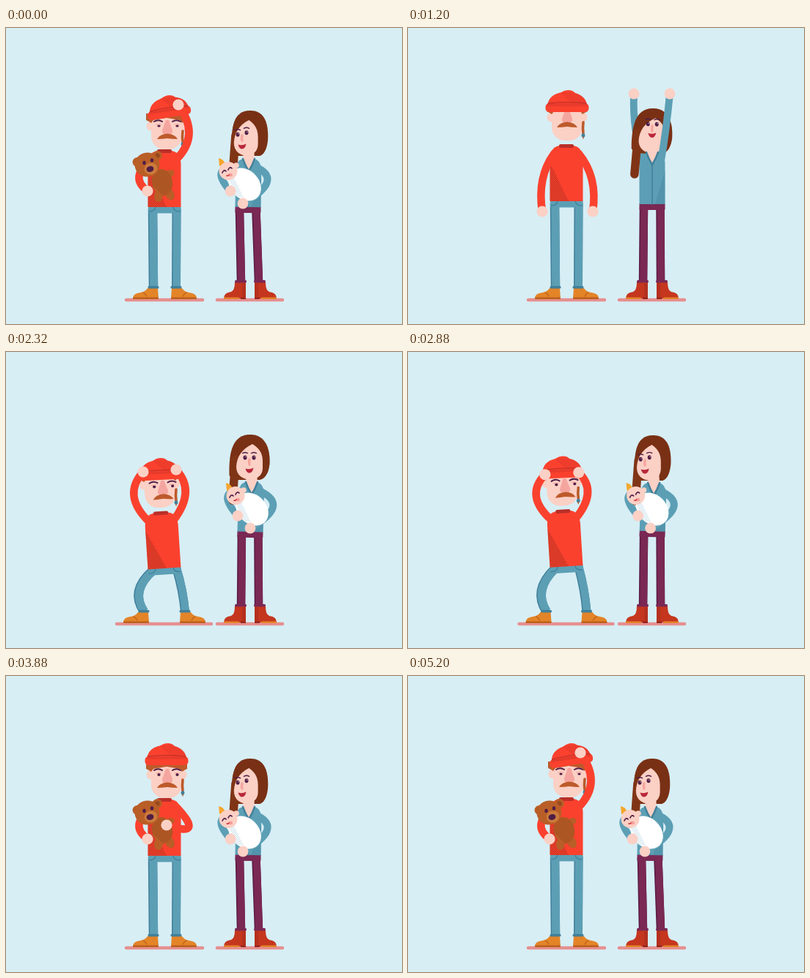
Write an HTML page with a canvas that moves like this. It is 540 px wide and 405 px high and loops after 5240 ms.

```html
<!DOCTYPE html>
<html lang="en">
<head>
<meta charset="utf-8">
<title>New parents</title>
<style>
html, body { margin: 0; width: 100%; height: 100%; overflow: hidden; background: #d7eef5; }
canvas { display: block; width: 100vw; height: 100vh; }
</style>
</head>
<body>
<canvas id="stage" width="540" height="405"></canvas>
<script>
const ctx = document.getElementById('stage').getContext('2d');
const LOOP = 5240;
const C = {
  sky: '#d7eef5', skin: '#fbd0c5', pink: '#f5a59f', red: '#fa412e', redDark: '#b92f28',
  jeans: '#5c9fb5', jeansDark: '#41809a', ginger: '#bd5a2b', hair: '#803416', hairDark: '#6b2a13',
  plum: '#7a2854', plumDark: '#5a1b46', ink: '#4f1d45', shoe: '#e38428', sole: '#bb601c',
  boot: '#c5361f', bootDark: '#96261c', bear: '#b95e27', bearDark: '#97481f', ground: '#e68f8f'
};

// --- motion -------------------------------------------------------------
const clamp = v => Math.max(0, Math.min(1, v));
const smooth = v => v * v * (3 - 2 * v);
function mix(a, b, k) {
  if (typeof a === 'number') return a + (b - a) * k;
  if (Array.isArray(a)) return a.map((v, i) => mix(v, b[i], k));
  const out = {};
  for (const n in a) out[n] = mix(a[n], b[n], k);
  return out;
}
function at(keys, t) {
  let i = 0;
  while (i < keys.length - 1 && keys[i + 1][0] <= t) i++;
  if (i === keys.length - 1) return keys[i][1];
  const [t0, a] = keys[i], [t1, b] = keys[i + 1];
  return mix(a, b, smooth(clamp((t - t0) / (t1 - t0))));
}
const vary = (pose, change) => ({ ...pose, ...change });

// waist, collar, head, turn, hat (x, y, tilt), gaze, hands, elbows, ankles, knee bend, eyes, brows, braid
const mStand = {
  waist: [219, 240], collar: [221, 164], head: [223, 141], rot: 0, hat: [0, 0, 0], look: [3, 0],
  lh: [188, 249], le: [173, 204], rh: [283, 241], re: [249, 222],
  lf: 201, rf: 232, bend: [0, 0], eye: 0, brow: 0, braid: 0
};
const mLeft = vary(mStand, { waist: [217, 239], collar: [217, 161], head: [218, 138], lh: [184, 249], le: [172, 203] });
const mLookUp = vary(mStand, {
  waist: [216, 237], collar: [216, 160], head: [217, 131], hat: [0, 6, 0], look: [0, -4],
  lh: [183, 251], le: [176, 204], rh: [252, 251], re: [259, 204], brow: 1
});
const mPanic = vary(mStand, {
  waist: [216, 296], collar: [211, 219], head: [210, 190], rot: -.05, hat: [1, 7, 0], look: [4, 3],
  lh: [187, 164], le: [158, 196], rh: [232, 161], re: [259, 190],
  lf: 188, rf: 244, bend: [-17, 2], eye: 1, brow: 1
});
const mShake = vary(mPanic, { waist: [218, 295], collar: [216, 218], head: [218, 190], rot: .07, lh: [193, 162], rh: [239, 163], re: [265, 190] });
const mReach = vary(mStand, {
  waist: [216, 242], collar: [216, 165], head: [216, 141], hat: [-2, 3, -.08], look: [0, -6],
  lh: [191, 72], le: [184, 128], rh: [240, 72], re: [249, 128], eye: .7, brow: 1
});
const mHold = vary(mStand, {
  waist: [216, 246], collar: [216, 168], head: [219, 144], look: [1, 0], lh: [193, 223], le: [167, 204],
  rh: [219, 204], re: [272, 222], eye: 1
});
const mDip = vary(mHold, { waist: [216, 256], collar: [216, 178], head: [218, 156], bend: [-7, 7] });
const mBonk = vary(mHold, {
  waist: [216, 249], collar: [217, 172], head: [220, 149], hat: [0, 3, 0], look: [0, 1], lh: [192, 225],
  rh: [217, 203], bend: [-4, 4], eye: 0, brow: 7, braid: 1
});
const mEnd = vary(mHold, {
  waist: [216, 245], collar: [216, 167], head: [219, 143], hat: [4, 1, -.16],
  rh: [235, 105], re: [265, 146], eye: .8
});
const manKeys = [
  [40, mLeft], [400, mStand], [700, mStand], [980, mLeft], [1180, mLookUp], [1400, mLookUp],
  [1640, mPanic], [1880, mShake], [2100, mPanic], [2360, mPanic], [2580, mShake], [2840, mPanic],
  [3160, mLookUp], [3330, mReach], [3560, mReach], [3670, mDip], [3860, mHold], [4320, mHold],
  [4390, mBonk], [4440, mBonk], [4640, mHold], [4800, mHold], [5060, mEnd], [5240, mEnd]
];

const wEnd = {
  waist: [330, 245], collar: [331, 178], head: [332, 143], rot: 0, look: [-8, 0],
  lh: [306, 223], le: [275, 188], rh: [323, 240], re: [378, 209], baby: [0, 0]
};
const cradle = (x, y, change) => vary(wEnd, {
  lh: [306 + x, 223 + y], le: [275 + x, 188 + y], rh: [323 + x, 240 + y], re: [378 + x, 209 + y],
  baby: [x, y], ...change
});
const wLean = vary(wEnd, {
  waist: [335, 251], collar: [337, 182], head: [347, 153], rot: .2, look: [0, -10],
  lh: [283, 241], le: [318, 234], rh: [367, 252], re: [374, 214]
});
const wStand = vary(wLean, { waist: [333, 249], collar: [334, 179], head: [338, 149], rot: .06, look: [-4, -4] });
const wReach = vary(wEnd, {
  waist: [333, 241], collar: [333, 169], head: [333, 140], rot: .03, look: [0, -10],
  lh: [308, 90], le: [306, 142], rh: [357, 90], re: [352, 142]
});
const wDip = cradle(8, 8, { waist: [333, 254], collar: [334, 186], head: [332, 154], look: [-6, 3] });
const wFront = cradle(10, 1, { waist: [333, 246], collar: [335, 177], head: [332, 143], look: [0, 0] });
const wGlance = cradle(15, 0, { waist: [336, 247], collar: [337, 178], head: [336, 145], rot: .02 });
const wWatch = cradle(7, 1, { waist: [333, 245], collar: [335, 178], head: [333, 144] });
const womanKeys = [
  [40, wStand], [380, wLean], [760, wLean], [960, wStand], [1160, wReach], [1390, wReach],
  [1500, wDip], [1700, wFront], [1960, wGlance], [2240, wFront], [2480, wFront],
  [2800, wWatch], [3280, wGlance], [3500, wGlance], [3900, wEnd], [4340, wWatch], [4560, wWatch],
  [5000, wEnd], [5240, wEnd]
];

// --- drawing helpers ----------------------------------------------------
function fill(color, path) { ctx.beginPath(); path(); ctx.fillStyle = color; ctx.fill(); }
function oval(color, x, y, rx, ry = rx, a = 0) { fill(color, () => ctx.ellipse(x, y, rx, ry, a, 0, 7)); }
function poly(color, ...p) { fill(color, () => { for (let i = 0; i < p.length; i += 2) ctx.lineTo(p[i], p[i + 1]); }); }
function box(color, x, y, w, h, r = 0) { fill(color, () => ctx.roundRect(x, y, w, h, r)); }
function curve(color, w, a, c, b, cap = 'round') {
  ctx.beginPath(); ctx.moveTo(...a); ctx.quadraticCurveTo(...c, ...b);
  ctx.lineCap = cap; ctx.lineWidth = w; ctx.strokeStyle = color; ctx.stroke();
}
function hatch(color, path, x, y, w, h) {
  ctx.save();
  ctx.beginPath(); path(); ctx.clip();
  ctx.beginPath();
  for (let i = -h; i < w; i += 2.6) { ctx.moveTo(x + i, y); ctx.lineTo(x + i + h, y + h); }
  ctx.lineWidth = .9; ctx.strokeStyle = color; ctx.stroke();
  ctx.restore();
}
function local(x, y, a, draw) { ctx.save(); ctx.translate(x, y); ctx.rotate(a); draw(); ctx.restore(); }
const lean = p => Math.atan2(p.collar[0] - p.waist[0], p.waist[1] - p.collar[1]);
const tall = p => Math.hypot(p.collar[0] - p.waist[0], p.waist[1] - p.collar[1]);
function joint(p, x, y) {
  const a = lean(p), c = Math.cos(a), s = Math.sin(a);
  return [p.waist[0] + x * c - y * s, p.waist[1] + x * s + y * c];
}
function leg(hip, ankle, bend, w, color, dark) {
  const mid = [(hip[0] + ankle[0]) / 2 + bend * 1.5, (hip[1] + ankle[1]) / 2];
  const shift = ([x, y]) => [x + .7, y];
  curve(dark, w, hip, mid, ankle, 'butt');
  curve(color, w - 1.6, shift(hip), shift(mid), shift(ankle), 'butt');
}
function ground(x0, x1) { curve(C.ground, 4.5, [x0 + 2, 372], [x0 + 9, 372], [x1 - 2, 372]); }

// --- man ----------------------------------------------------------------
function shoe(x, dir) {
  local(x, 0, 0, () => {
    ctx.scale(dir, 1);
    fill(C.shoe, () => {
      ctx.moveTo(-8, 356); ctx.lineTo(6, 356); ctx.lineTo(7, 370); ctx.lineTo(-28, 370);
      ctx.quadraticCurveTo(-28, 363, -18, 362); ctx.quadraticCurveTo(-11, 361, -8, 356);
    });
    box(C.sole, -28, 368.5, 35, 2.5, 1);
    curve(C.sole, 1.2, [-14, 362], [-11, 363], [-9, 367]);
    box(C.jeansDark, -7.5, 353, 15, 3.5, 1.5);
  });
}
function hat([x, y, tilt]) {
  local(x, y - 27, tilt, () => {
    const dome = () => {
      ctx.moveTo(-27, -3); ctx.bezierCurveTo(-25, -18, -15, -20, -8, -22);
      ctx.bezierCurveTo(-2, -26, 7, -26, 11, -21); ctx.bezierCurveTo(22, -18, 27, -11, 27, -3);
    };
    fill(C.red, dome);
    hatch('rgba(160,35,35,.35)', dome, 8, -22, 20, 16);
    box(C.red, -29.5, -7, 59, 12, 5);
    curve(C.redDark, 1, [-26, -7], [0, -10], [26, -7]);
    hatch('rgba(160,35,35,.55)', () => ctx.rect(-27, -7, 54, 4), -27, -7, 54, 4);
  });
}
function manHead(p) {
  local(...p.head, p.rot, () => {
    const [lx, ly] = p.look;
    oval(C.skin, -22, -9, 5.5, 6.5);
    oval(C.skin, 22, -9, 5.5, 6.5);
    fill(C.skin, () => ctx.roundRect(-21, -28, 42, 51, [4, 4, 18, 18]));
    for (const s of [-1, 1]) poly(C.ginger, 0, -26, s * 28, -26, s * 28, -17, s * 24, -15, s * 21, -13, s * 18, -17, 0, -20);
    local(lx, ly, 0, () => {
      for (const s of [-1, 1]) {
        const x = s * 12.5;
        curve(C.ink, 2, [x - 5.5, -15 + p.brow], [x, -18.5 + p.brow], [x + 5.5, -15 + p.brow]);
        if (p.eye > .1) {
          oval(C.ink, x + 1, -9, 2.1, 2 * p.eye);
          curve(C.pink, 1, [x - 3, -11], [x, -12], [x + 4, -11]);
        }
      }
      fill(C.pink, () => {
        ctx.moveTo(-2, -17); ctx.lineTo(2, -17); ctx.lineTo(7, -3);
        ctx.quadraticCurveTo(8, 3, 0, 3); ctx.quadraticCurveTo(-8, 3, -7, -3);
      });
      fill(C.ginger, () => {
        ctx.moveTo(-14, 9); ctx.quadraticCurveTo(-10, 2, 0, 1.5); ctx.quadraticCurveTo(10, 2, 14, 9);
        ctx.quadraticCurveTo(7, 9, 0, 8); ctx.quadraticCurveTo(-7, 9, -14, 9);
      });
    });
    hat(p.hat);
  });
  const [x, y] = p.head;
  local(x + 22, y - 2, p.braid * -1.1, () => {
    curve(C.ginger, 3.6, [0, 0], [-1, 8], [0, 15]);
    oval(C.jeansDark, 0, 18, 2.4, 2.8);
    curve(C.ginger, 1.4, [0, 20], [0, 21], [0, 22]);
  });
}
function man(p, t) {
  const h = tall(p), bear = t < 40 || t >= 3400;
  ground(p.lf - 39, p.rf + 38);
  leg(joint(p, -16, 2), [p.lf, 355], p.bend[0], 12.5, C.jeans, C.jeansDark);
  leg(joint(p, 16.5, 2), [p.rf, 355], p.bend[1], 12, C.jeans, C.jeansDark);
  shoe(p.lf, 1);
  shoe(p.rf, -1);
  local(...p.waist, lean(p), () => {
    box(C.jeans, -22, -2, 44.5, 10.5, 2);
    for (const s of [-1, 1]) curve(C.jeansDark, 1.4, [s * 12, 0], [s * 13, 6], [s * 21, 6]);
    fill(C.red, () => {
      ctx.moveTo(-22.5, 0); ctx.lineTo(-22.5, 18 - h);
      ctx.quadraticCurveTo(-21, 2 - h, -9, 1 - h); ctx.lineTo(9, 1 - h);
      ctx.quadraticCurveTo(21, 2 - h, 22.5, 18 - h); ctx.lineTo(22.5, 0);
    });
    hatch('rgba(110,35,20,.6)', () => {
      ctx.moveTo(-22.5, 24 - h); ctx.lineTo(3, 0); ctx.lineTo(-22.5, 0);
    }, -23, -h, 27, h);
    box(C.redDark, -10, -1 - h, 20, 5, 2);
  });
  manHead(p);
  curve(C.red, 10.5, joint(p, -17, 12 - h), p.le, p.lh);
  curve(C.red, 10.5, joint(p, 17, 12 - h), p.re, p.rh);
  if (bear) teddy(t);
  if (t > 4040 && t < 5130) bottle(t);
  oval(C.skin, ...p.lh, 7.6);
  oval(C.skin, ...p.rh, 7.6);
}

// --- woman --------------------------------------------------------------
function boot(x, dir) {
  local(x, 0, 0, () => {
    ctx.scale(dir, 1);
    fill(C.boot, () => {
      ctx.moveTo(-8, 348); ctx.lineTo(7, 348); ctx.lineTo(7, 370); ctx.lineTo(-23, 370);
      ctx.quadraticCurveTo(-23, 362, -13, 361); ctx.quadraticCurveTo(-8, 359, -8, 348);
    });
    hatch(C.bootDark, () => ctx.rect(2, 349, 5, 19), 2, 349, 5, 19);
    box(C.shoe, -23, 368.5, 21, 2.5, 1);
    box(C.bootDark, 0, 368.5, 7, 2.5);
    box(C.plum, -8, 345, 16, 3.5, 1.5);
  });
}
function womanHead(p) {
  const [lx, ly] = p.look, side = Math.abs(lx);
  local(...p.head, p.rot, () => {
    const w = 27.5 - side * .4, right = 27.5 - side * .3, hair = () => {
      ctx.moveTo(-w, 26); ctx.bezierCurveTo(-w - 1, -8, -22, -30, 1, -30);
      ctx.bezierCurveTo(21, -30, right + 1, -12, right, 10);
      ctx.quadraticCurveTo(right - 2, 29, 14, 32); ctx.lineTo(-w + 6, 32);
    };
    fill(C.hair, hair);
    hatch(C.hairDark, hair, 4, -30, 30, 62);
  });
  const [x, y] = p.head;
  curve(C.hair, 11.5, [x - 19, y + 4], [x - 21 - p.rot * 20, y + 30], [x - 23 - p.rot * 38, y + 60]);
  poly(C.skin, p.collar[0] - 7, y + 20, p.collar[0] + 7, y + 20, p.collar[0] + 8, p.collar[1] + 3, p.collar[0], p.collar[1] + 17, p.collar[0] - 8, p.collar[1] + 3);
  local(x, y, p.rot, () => {
    const w = 18 - side * .2;
    local(lx * .6, 0, 0, () => fill(C.skin, () => {
      ctx.moveTo(-w, 14); ctx.quadraticCurveTo(-w + 1, -7, 4, -17);
      ctx.quadraticCurveTo(w, -9, w, 6); ctx.lineTo(w, 16);
      ctx.bezierCurveTo(w, 37, -w, 37, -w, 14);
    }));
    local(lx * 1.25, ly, 0, () => {
      for (const s of [-1, 1]) {
        const ex = s * 6, ey = 1.5 + s * lx * .15;
        oval(C.ink, ex, ey, 2.5, 3);
        oval('#fff', ex + .9, ey - 1, .6);
        curve(C.ink, 1.4, [ex - 3.5, ey - 6], [ex, ey - 8], [ex + 3.5, ey - 6]);
      }
      curve(C.pink, 3.4, [0, 4], [-1, 8], [0, 11]);
      const lip = 16.5 + ly * .25;
      fill('#b8283a', () => {
        ctx.moveTo(-5.5, lip); ctx.quadraticCurveTo(0, lip + 2, 5.5, lip - 1);
        ctx.quadraticCurveTo(4, lip + 6, 0, lip + 6); ctx.quadraticCurveTo(-4, lip + 6, -5.5, lip);
      });
    });
  });
}
function woman(p, t) {
  const h = tall(p);
  ground(286, 379);
  leg(joint(p, -11.5, 4), [320.5, 347], 0, 11.5, C.plum, C.plumDark);
  leg(joint(p, 11, 4), [344.5, 347], 0, 11.5, C.plum, C.plumDark);
  boot(320, 1);
  boot(346, -1);
  curve(C.jeans, 9.8, joint(p, -12, 13 - h), p.le, p.lh);
  local(...p.waist, lean(p), () => {
    box(C.plum, -17.5, -1, 35, 9, 1);
    fill(C.jeans, () => {
      ctx.moveTo(-17.5, 0); ctx.lineTo(-17.5, 15 - h);
      ctx.quadraticCurveTo(-16, 2 - h, -7, 1 - h); ctx.lineTo(7, 1 - h);
      ctx.quadraticCurveTo(16, 2 - h, 17.5, 15 - h); ctx.lineTo(17.5, 0);
    });
    hatch(C.jeansDark, () => { ctx.moveTo(17.5, 25 - h); ctx.lineTo(17.5, 0); ctx.lineTo(4, 0); }, 0, -h, 20, h);
    curve(C.jeansDark, 1.6, [0, 18 - h], [0, -20], [0, 0]);
  });
  womanHead(p);
  const [cx, cy] = p.collar;
  for (const s of [-1, 1]) curve(C.jeansDark, 2.4, [cx + s * 8, cy + 1], [cx + s * 5, cy + 10], [cx, cy + 18]);
  curve(C.jeans, 9.8, joint(p, 12, 13 - h), p.re, p.rh);
  if (t < 40 || t >= 1240) baby(p, t);
  oval(C.skin, ...p.lh, 7.4);
  oval(C.skin, ...p.rh, 7.4);
}

// --- things from the sky ------------------------------------------------
const drop = (t, t0, t1, height) => t > 40 && t < t1 ? -height * (1 - clamp((t - t0) / (t1 - t0)) ** 1.4) : 0;

function baby(p, t) {
  local(p.baby[0], p.baby[1] + drop(t, 1240, 1440, 260), 0, () => {
    const wrap = () => ctx.ellipse(325.5, 214, 25, 19.5, .8, 0, 7);
    fill('#ffffff', wrap);
    hatch('#b9d9e6', () => {
      ctx.moveTo(304, 206); ctx.lineTo(311, 205); ctx.lineTo(324, 232); ctx.lineTo(312, 230);
    }, 300, 200, 28, 34);
    poly('#f5a62c', 290, 178, 295, 180, 300, 186, 291, 189);
    oval(C.skin, 303, 195.5, 12.5, 12.5);
    oval(C.skin, 314, 188, 3.8);
    oval('#f69c97', 306, 201, 2.8, 2.2);
    curve(C.ink, 1.7, [295, 198], [297, 193], [300, 196]);
    curve(C.ink, 1.7, [303, 194], [305, 189], [308, 192]);
    curve('#c9252f', 1.4, [301, 202], [303, 203], [304, 201]);
  });
  const s = 1 - Math.abs(t - 3360) / 160;
  if (s > 0) {
    oval('#fff', 303, 201, 2.4 * s);
    oval('#fff', 321, 179, 2.4 * s);
  }
}
function teddy(t) {
  const bob = t > 3600 && t < 3860 ? 9 * Math.sin((t - 3600) / 260 * Math.PI) : 0;
  local(0, drop(t, 3410, 3610, 250) + bob, 0, () => {
    oval(C.bear, 222, 200, 8, 5, -.5);
    oval(C.bear, 223, 227, 6, 9, -.5);
    oval(C.bear, 208, 230, 6, 8, .1);
    const body = () => ctx.ellipse(213, 211, 14, 18, -.2, 0, 7);
    fill(C.bear, body);
    hatch(C.bearDark, body, 216, 194, 18, 36);
    for (const [x, y] of [[179, 183.5], [206.5, 174.5]]) {
      oval(C.bear, x, y, 6.5);
      oval(C.bearDark, x, y, 3.2);
    }
    oval(C.bear, 192.5, 187, 17, 16.5, -.3);
    oval('#cc7a3c', 197.5, 192.5, 9, 8, -.3);
    oval(C.ink, 188.5, 184.5, 2.2, 2.8);
    oval(C.ink, 199, 181, 2.2, 2.8);
    oval(C.ink, 196.5, 193, 5, 4, -.3);
  });
}
function bottle(t) {
  const fall = Math.max(0, t - 4760);
  const x = 202.5 - fall * .12, y = 213 + drop(t, 4060, 4230, 240) - fall * .1 + fall * fall * .0019;
  local(x, y, .12 - fall * .012, () => {
    box('#f4a52b', -4, 7, 8, 5, 1);
    poly('#f4a52b', -3, 11, 3, 11, 1, 16, -1, 16);
    box('#eef8fb', -5, -9, 10, 17, 2);
    for (const s of [-3, 1]) box('#78b4c6', s, -7, 2, 13);
  });
}
function ball(t) {
  if (t < 4160) return;
  const dt = t - 4360, r = 9.5, floor = 393;
  const x = dt < 0 ? 210 : 210 - .29 * dt;
  const y = dt < 0 ? -13 + 105 * ((t - 4160) / 200) ** 2 : 92 - .564 * dt + .00159 * dt * dt;
  local(x, y > floor ? floor - (y - floor) * .35 : y, -.01 * (dt - 30), () => {
    oval(C.plumDark, 0, 0, r);
    fill('#3d8aa2', () => ctx.arc(0, 0, r, Math.PI / 2, Math.PI * 1.5));
    box('#e6f4f7', -1, -r, 3, r * 2, 1);
  });
  if (dt >= 0 && dt < 140) {
    for (const s of [-1, 1]) oval('#f4a15c', 214.5 + s * (5 + dt * .07), 99 + s - dt * .01, 1.8 * (1 - dt / 160));
  }
}

// --- loop ---------------------------------------------------------------
function render(t) {
  ctx.fillStyle = C.sky;
  ctx.fillRect(0, 0, 540, 405);
  const still = t < 40;
  woman(still ? wEnd : at(womanKeys, t), t);
  man(still ? mEnd : at(manKeys, t), t);
  ball(t);
}
const start = performance.now();
function tick() {
  const t = (performance.now() - start) % LOOP;
  render(Math.floor(t / 40) * 40);
  requestAnimationFrame(tick);
}
tick();
</script>
</body>
</html>
```
